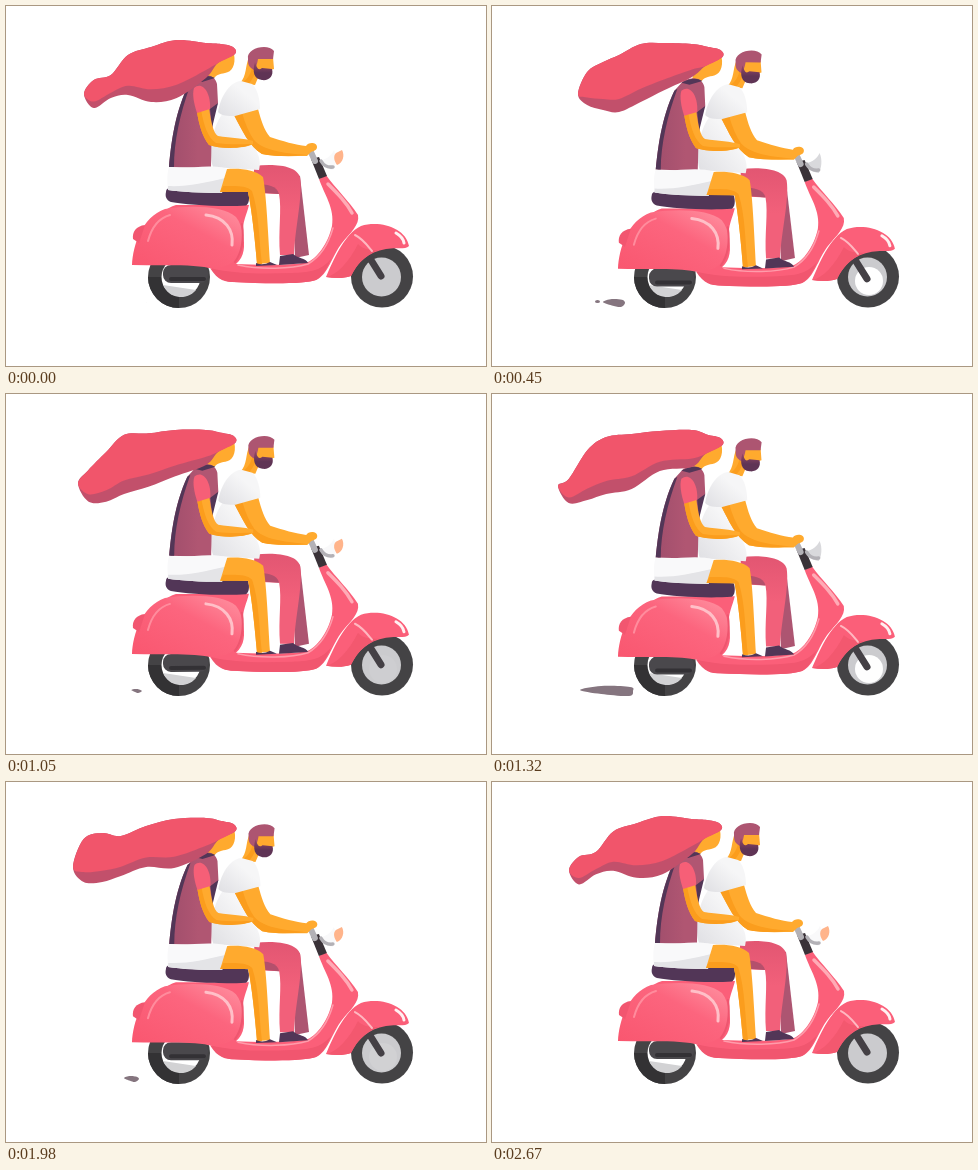
Recreate the animation shown at these times as an HTML page. Size 480 by 360 pixels, loop 2700 ms.

```html
<!DOCTYPE html>
<html lang="en">
<head>
<meta charset="utf-8">
<title>Scooter ride</title>
<style>
  html, body { margin: 0; width: 100%; height: 100%; overflow: hidden; background: #fff; }
  svg { display: block; width: 100vw; height: 100vh; }
  .pink { fill: #fb5f79; }
  .plum { fill: #ad5571; }
  .dark { fill: #523657; }
  .skin { fill: #ffaa2e; }
  .skin-shade { fill: #fb9d1d; }
  .tyre { fill: #444345; }
  .line { fill: none; stroke-linecap: round; }
</style>
</head>
<body>
<svg viewBox="0 0 480 360">
  <defs>
    <linearGradient id="cowl" x1="0" y1="1" x2="1" y2="0">
      <stop offset="0" stop-color="#f9566f"/><stop offset=".6" stop-color="#fc657e"/><stop offset="1" stop-color="#ff94a3"/>
    </linearGradient>
    <linearGradient id="shirt" x1="1" y1="0" x2="0" y2="1">
      <stop offset=".35" stop-color="#f6f6f7"/><stop offset="1" stop-color="#dfdfe3"/>
    </linearGradient>
    <linearGradient id="beard" x1="0" y1="0" x2="0" y2="1">
      <stop offset="0" stop-color="#9a4a68"/><stop offset=".6" stop-color="#5f3455"/>
    </linearGradient>
    <linearGradient id="vest" x1="0" y1="0" x2="1" y2="0">
      <stop offset="0" stop-color="#a04e6c"/><stop offset=".6" stop-color="#b05672"/>
    </linearGradient>
    <linearGradient id="trousers" x1="0" y1="0" x2="0" y2="1">
      <stop offset="0" stop-color="#e25672"/><stop offset=".5" stop-color="#f2607a"/>
    </linearGradient>
  </defs>

  <path id="puff" fill="#85757f"/>
  <ellipse id="speck" cx="105.500" cy="295.500" rx="2.500" ry="1.500" fill="#85757f"/>

  <!-- wheels -->
  <g>
    <circle class="tyre" cx="173" cy="271" r="31"/>
    <path d="M173 302A31 31 0 0 1 142 271L155 271 173 290Z" fill="#333234"/>
    <circle cx="175" cy="271" r="19.500" fill="#fff"/>
    <path d="M157 279L190 284A19.500 19.500 0 0 1 157 279Z" fill="#d2d2d4"/>
    <circle class="tyre" cx="376" cy="270.500" r="31"/>
    <circle cx="375.500" cy="271" r="19.500" fill="#cbcbce"/>
    <circle id="shine" cx="377" cy="275" r="14" fill="#fff"/>
  </g>

  <g id="ride">
    <!-- scooter -->
    <rect x="157" y="259" width="45" height="18" rx="8" fill="#4a484c"/>
    <path d="M165 273H198" class="line" stroke="#333135" stroke-width="4"/>
    <path d="M360 246L375 270" class="line" stroke="#444045" stroke-width="7"/>
    <path class="plum" d="M286 168L294 170 303 249 289 252Z"/>
    <path class="pink" d="M313 173C318 188 329 202 326 220C322 238 311 252 302 256C282 260 250 259 230 258C239 250 239 240 237 228C236 216 241 208 243 199L170 199C150 205 140 226 135 245L205 262C209 268 214 275 226 276C262 278 300 278 310 274C322 269 326 250 336 237C344 227 354 219 352 209C343 195 330 183 320 169Z"/>
    <path d="M204 262C212 275 220 276 228 276C262 278 300 278 310 274C317 270 321 262 325 253C314 266 302 266 286 267C255 268 228 268 204 262Z" fill="#f1566f"/>
    <path d="M232 259C255 264 285 263 302 258C314 251 322 240 327 222" class="line" stroke="#ff9cab" stroke-width="1.500"/>
    <path d="M322 178C332 188 340 196 346 207" class="line" stroke="#ffabb6" stroke-width="3.500"/>
    <path d="M126 259C127 239 136 211 159 203C185 199 218 200 230 211C238 221 239 238 231 251C226 260 215 262 203 262C185 258 155 260 126 259Z" fill="url(#cowl)"/>
    <path d="M200 209C219 211 228 224 226 239" class="line" stroke="#ffc0c8" stroke-width="3"/>
    <path d="M142 235C146 220 153 212 164 209" class="line" stroke="#ff8c9d" stroke-width="2"/>
    <path d="M236 218C238 232 236 246 229 256" class="line" stroke="#ee566f" stroke-width="2"/>
    <path d="M139 219C130 220 126 226 127 233L133 237Z" fill="#f25670"/>
    <path class="pink" d="M320 271C327 255 338 228 355 220C374 214 400 222 403 240C399 244 390 241 380 243C362 246 352 256 345 270C336 273 328 272 320 271Z"/>
    <path d="M320 271C331 269 343 256 352 238C357 244 366 244 373 244C359 249 351 258 345 270C336 273 328 272 320 271Z" fill="#f3586f"/>
    <path d="M349 229C357 233 361 239 366 245" class="line" stroke="#ffb8c1" stroke-width="2"/>
    <path d="M390 227Q397 231 398 237" class="line" stroke="#fff0f1" stroke-width="3"/>
    <path class="dark" d="M160 186C160 180 170 180 180 182L242 186C244 192 243 198 240 199.500C215 201 180 199 165 196C160 194 159 190 160 186Z"/>
    <path d="M305 153L313 151 321 170 313 173Z" fill="#3a3238"/>
    <path id="lamp" d="M315 154C321 153 326 149 328 144C331 150 330 160 327 164C320 163 317 160 315 154Z" fill="#d9d9dc"/>
    <path d="M315 155Q319 162 327 161" class="line" stroke="#b3b1b6" stroke-width="3.500"/>
    <path d="M304 144L309 155" class="line" stroke="#b3b1b6" stroke-width="6"/>
    <path id="glint" d="M336 144C339 149 337 157 331 159C328 155 327 150 330 147Z" fill="#ffb48b"/>

    <g id="riders">
      <!-- driver -->
      <path d="M248 160C270 157 291 160 294 171C297 190 289 222 288 249L274 249C272 225 276 203 273 188L248 187Z" fill="url(#trousers)"/>
      <path d="M248 186L273 188C271 180 262 178 248 178Z" fill="#b4506c"/>
      <path class="dark" d="M274 250L287 248C291 252 300 252 302 257L273 259Z"/>
      <path d="M218 106C207 118 202 145 207 161L253 164C257 150 247 140 240 128L235 106Z" fill="url(#shirt)"/>
      <path class="skin" d="M243 51L267 51 268 63 254 67 249 79 234 77C241 70 239 60 243 51Z"/>
      <path class="skin-shade" d="M246 62C244 70 240 75 234 77L242 79C246 74 249 68 250 65Z"/>
      <path class="plum" d="M242 53C240 42 262 37 268 45L267 53 252 53C251 59 250 61 248 64C242 61 242 57 242 53Z"/>
      <path d="M249 56C251 62 252 65 256 62L266 63C268 70 263 75 256 74C248 73 246 66 249 56Z" fill="url(#beard)"/>
      <path class="skin" d="M228 109L252 103C255 114 258 124 264 131C276 135 290 139 300 140C302 136 311 136 311 141C311 144 308 145 305 146L301 150C285 150 270 151 256 148C243 140 236 124 228 109Z"/>
      <path class="skin-shade" d="M228 109C236 124 243 140 256 148C270 151 285 150 301 149C275 147 257 144 248 134Q241 124 236 107Z"/>
      <path d="M235 75C223 76 214 92 212 106C215 110 222 110 229 110L254 103C254 93 251 82 246 78Z" fill="url(#shirt)"/>

      <!-- passenger -->
      <path class="skin" d="M228 48C230 59 226 66 219 67C213 68 211 69 208 72L198 72 204 54Z"/>
      <path d="M190 72C200 67 209 69 211 78L212 97C204 112 206 140 205 162L163 161C165 140 168 110 181 82Z" fill="url(#vest)"/>
      <path class="dark" d="M181 82C168 110 165 140 163 161L168 161C168 135 174 108 184 80ZM188 74Q200 67 209 72L196 76ZM212 97L204 103 206 122Z"/>
      <path d="M163 161C180 164 205 157 221 163L216 187C195 187 175 186 162 184C161 175 161 167 163 161Z" fill="#f9f9fa"/>
      <path d="M162 180C180 181 198 177 219 172L216 187C195 187 175 186 162 184Z" fill="#e4e4e7"/>
      <path class="skin" d="M221 163C235 162 250 164 257 171C260 185 262 225 264 257L251 258C249 235 246 205 242 186L214 186Z"/>
      <path class="skin-shade" d="M214 186L217 180C230 180 240 179 246 185C253 205 253 235 256 258L251 258C249 235 246 205 242 186Z"/>
      <path class="dark" d="M250 257Q257 260 264 256L271 259 250 260Z"/>
      <path class="skin" d="M191 106L203 102C205 115 207 127 212 130C225 132 238 132 247 135L247 138C238 143 215 143 203 139C196 130 193 118 191 106Z"/>
      <path class="skin-shade" d="M191 106L195 104C198 120 202 132 210 137C224 139 238 138 246 138C236 143 214 143 203 139C196 130 193 118 191 106Z"/>
      <path d="M188 82C196 75 205 86 204 103L191 107C188 98 186 88 188 82Z" fill="#f65f77"/>
    </g>
  </g>

  <path id="hairShade" fill="#c2506b"/>
  <path id="hairLight" fill="#f1556b"/>
</svg>

<script>
const LOOP = 2700, BEAT = 900, STEP = 30;
const el = id => document.getElementById(id);
const clamp = v => Math.max(0, Math.min(1, v));
const mix = (a, b, k) => a + (b - a) * k;

// Hair poses: time, tail x, tail y, six heights of the top edge, six of the bottom edge.
const columns = [.08, .22, .36, .55, .76, 1];
const poses = [
  [0, 78, 88, 74, 69, 49, 41, 34, 37, 102, 92, 89, 96, 92, 72],
  [450, 86, 88, 66, 56, 49, 38, 37, 38, 99, 104, 106, 96, 84, 71],
  [780, 79, 86, 64, 59, 41, 39, 35, 36, 104, 108, 100, 90, 88, 69],
  [1320, 66, 92, 85, 56, 43, 40, 37, 36, 109, 106, 100, 95, 77, 73],
  [1980, 67, 85, 57, 51, 54, 44, 37, 36, 100, 100, 94, 85, 86, 72],
  [2370, 66, 93, 81, 72, 57, 45, 38, 37, 108, 105, 97, 92, 91, 73]
];

function hairPose(t) {
  const n = poses.length;
  const i = poses.findLastIndex(p => p[0] <= t);
  const [a, b, c, d] = [-1, 0, 1, 2].map(o => poses[(i + o + n) % n]);
  const k = (t - b[0]) / ((c[0] || LOOP) - b[0]);
  return b.map((v, j) => v + k / 2 * (c[j] - a[j] + k * (2 * a[j] - 5 * v + 4 * c[j] - d[j]
    + k * (3 * (v - c[j]) + d[j] - a[j]))));
}

// Smooth closed curve through the points.
function blob(points) {
  const n = points.length, at = i => points[(i + n) % n];
  const handle = (i, s) => [0, 1].map(k => at(i)[k] + s * (at(i + 1)[k] - at(i - 1)[k]) / 6);
  return "M" + points[0] + points.map((p, i) =>
    `C${handle(i, 1)} ${handle(i + 1, -1)} ${at(i + 1)}`).join("") + "Z";
}

function drawHair(t, bob) {
  const [, tailX, tailY, ...edges] = hairPose(t);
  const xs = columns.map(u => mix(tailX, 200, u));
  const top = xs.map((x, i) => [x, edges[i]]);
  const bottom = xs.map((x, i) => [x, edges[i + 6]]).reverse();
  const fold = xs.map((x, i) => [x, mix(edges[i], edges[i + 6], .77)]).reverse();
  const head = [[215, 38], [227, 41], [229, 48], [212, 57]].map(([x, y]) => [x + 1.5 * bob, y + 3 * bob]);
  const tail = [tailX, tailY];
  el("hairShade").setAttribute("d", blob([tail, ...top, ...head, ...bottom]));
  el("hairLight").setAttribute("d", blob([tail, ...top, ...head, ...fold]));
}

// Exhaust puff keys: phase, left, right, height.
const puffKeys = [[.1, 140, 142, 0], [.2, 118, 133, 6], [.467, 88, 141, 10], [.6, 111, 133, 8], [.63, 112, 126, 0]];

function drawPuff(t) {
  const phase = t % BEAT / BEAT + (t < BEAT ? .1 : 0);
  const i = puffKeys.findIndex(k => k[0] > phase);
  let d = "";
  if (i > 0) {
    const a = puffKeys[i - 1], b = puffKeys[i], k = (phase - a[0]) / (b[0] - a[0]);
    const [, l, r, h] = a.map((v, j) => mix(v, b[j], k));
    const y = 297;
    d = blob([[l, y - 1], [mix(l, r, .4), y - h / 2], [r - 3, y - h * .4], [r, y],
      [r - 4, y + h / 2], [mix(l, r, .4), y + h * .3]]);
  }
  el("puff").setAttribute("d", d);
  el("speck").setAttribute("opacity", phase > .55 && phase < .62 ? 1 : 0);
}

function draw(now) {
  const t = Math.floor(now % LOOP / STEP) * STEP;
  const angle = t / BEAT * 2 * Math.PI;
  const bob = (1 - Math.cos(angle)) / 2;
  const glint = clamp((Math.cos(angle - .53) - .5) * 5);
  el("ride").setAttribute("transform", `translate(0 ${3.3 * bob}) rotate(${-.2 * bob} 250 265)`);
  el("riders").setAttribute("transform", `rotate(${.65 * bob} 255 258)`);
  el("glint").setAttribute("opacity", glint);
  el("lamp").setAttribute("opacity", 1 - .85 * glint);
  el("shine").setAttribute("opacity", bob * bob);
  drawHair(t, bob);
  drawPuff(t);
  requestAnimationFrame(draw);
}
requestAnimationFrame(draw);
</script>
</body>
</html>
```
